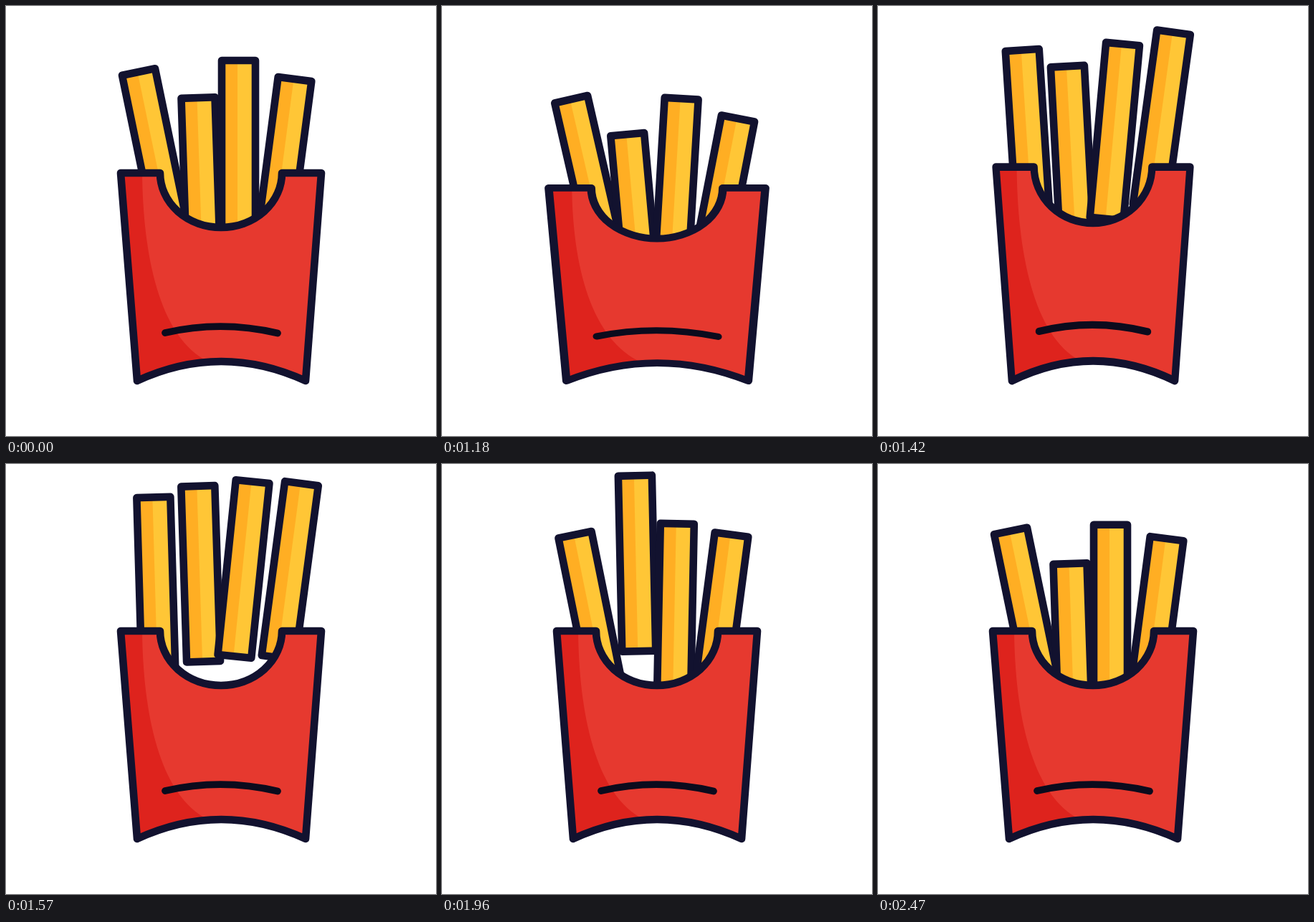
An HTML page with a canvas for the animation above (2.5 s loop, 600 by 600 pixels).

```html
<!DOCTYPE html>
<html>
<head>
<meta charset="utf-8">
<style>
  html, body { margin: 0; height: 100%; overflow: hidden; background: #fff; }
  canvas { display: block; width: 600px; height: 600px; }
</style>
</head>
<body>
<canvas id="stage" width="600" height="600"></canvas>
<script>
const ctx = document.getElementById('stage').getContext('2d');
const LOOP = 2500, HOLD = 1030, STEP = 30, START = 1000, SETTLE = 600;
const INK = '#12122f';

// Poses: middle of the top edge, then lean in degrees.
// Times: end of the crouch, top of the jump, end of the fall.
const fries = [
  { side: -1, rest: [185, 92, -11.7], peak: [206, 46, -1.6], dip: 8, times: [1140, 1600, 2040] },
  { side: -1, rest: [268, 128, -1.9], peak: [269.5, 5, -1.2], dip: 11, times: [1245, 1770, 2460] },
  { side: 1, rest: [324.5, 76, 0], peak: [344.5, 20, 6], dip: 22, times: [1220, 1660, 2130] },
  { side: 1, rest: [403, 102, 7.5], peak: [412.5, 27, 7.6], dip: 5, times: [1180, 1510, 2150] }
];

const easeOut = u => 1 - (1 - u) ** 2;
const easeInOut = u => u < 0.5 ? 4 * u ** 3 : 1 - 4 * (1 - u) ** 3;
const swing = u => (1 - Math.cos(Math.PI * u)) / 2;
const mix = (from, to, u) => from.map((v, i) => v + (to[i] - v) * u);
const shift = (pose, ...by) => pose.map((v, i) => v + by[i]);

// Crouch and splay, jump, fall a little too deep, settle
function fryPose({ side, rest, peak, dip, times }, t) {
  const poses = [rest, shift(rest, 10 * side, 55, 3.5 * side), peak, shift(rest, 0, dip, 0), rest];
  const keys = [START, ...times, times[2] + SETTLE];
  const i = times.filter(key => t >= key).length;
  const u = (t - keys[i]) / (keys[i + 1] - keys[i]);
  return mix(poses[i], poses[i + 1], [easeOut, easeOut, easeInOut, swing][i](u));
}

// One damped wobble
function squash(t) {
  const period = 540, s = t - 1018;
  if (s < 0 || s > period) return 0;
  return 0.16 * Math.exp(-s / 250) * Math.sin(2 * Math.PI * s / period);
}

function outline(path, width, color) {
  ctx.lineWidth = width;
  ctx.strokeStyle = color;
  ctx.stroke(path);
}

function fill(path, color) {
  ctx.fillStyle = color;
  ctx.fill(path);
}

const fry = new Path2D('M-23.5 0h47v245h-47z');
const fryShade = new Path2D('M-23.5 0h22v245h-22z');
const box = new Path2D('M160 233H215A85 76 0 0 0 385 233H440L418 523Q300 469 183 523Z');
const boxShade = new Path2D('M150 225H190C190 340 212 462 282 496L183 540Z');
const mouth = new Path2D('M222 456Q300 438 379 456.5');

function drawFry([x, y, lean]) {
  ctx.save();
  ctx.translate(x, y);
  ctx.rotate(lean * Math.PI / 180);
  fill(fry, '#ffc636');
  fill(fryShade, '#ffae23');
  outline(fry, 10.6, INK);
  ctx.restore();
}

function drawBox(s) {
  ctx.save();
  ctx.translate(300, 525);
  ctx.scale(1 + s, 1 - 0.9 * s);
  ctx.translate(-300, -525);
  fill(box, '#e6392f');
  ctx.save();
  ctx.clip(box);
  fill(boxShade, '#de231d');
  ctx.restore();
  outline(box, 10.6, INK);
  outline(mouth, 9.8, '#0b0b1d');
  ctx.restore();
}

function draw(now) {
  const time = now % LOOP;
  const t = time < HOLD ? START : HOLD + Math.floor((time - HOLD) / STEP) * STEP;
  ctx.clearRect(0, 0, 600, 600);
  ctx.lineJoin = ctx.lineCap = 'round';
  for (const f of fries) drawFry(fryPose(f, t));
  drawBox(squash(t));
  requestAnimationFrame(draw);
}
requestAnimationFrame(draw);
</script>
</body>
</html>
```
